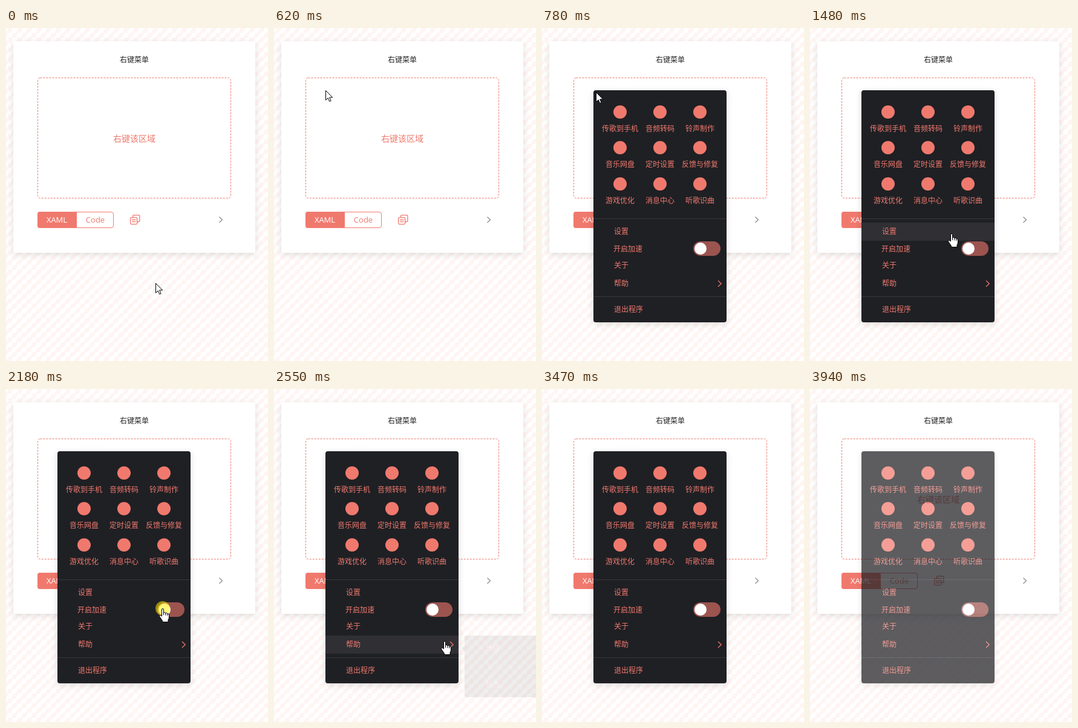
An HTML page for the animation above (4.02 s loop, 433 by 551 pixels).

```html
<!DOCTYPE html>
<html lang="zh-CN">
<head>
<meta charset="utf-8">
<title>右键菜单</title>
<style>
  html, body { margin: 0; width: 100%; height: 100%; overflow: hidden; background: #fff; }
  svg { display: block; width: 433px; height: 551px; }
  text { font: 12px "Noto Sans CJK SC", "Noto Sans CJK", sans-serif; fill: #f0796e; }
  .mid { text-anchor: middle; }
  .latin { font: 13px "Open Sans", "Noto Sans", sans-serif; }
  .line { fill: none; stroke: #f0796e; }
  .panel { fill: #1f2024; }
  .rule { stroke: #37383c; }
  .shadow { filter: drop-shadow(0 3px 6px rgba(0, 0, 0, .12)); }
  .pointer { fill: #fff; stroke: #000; stroke-linejoin: round; }
</style>
</head>
<body>
<svg viewBox="0 0 433 551">
  <defs>
    <pattern id="checks" width="16" height="16" patternUnits="userSpaceOnUse">
      <path d="M4 0H12L8 8H0ZM12 8H20L16 16H8ZM-4 8H4L0 16H-8Z" fill="#fff5f3"/>
    </pattern>
  </defs>
  <rect width="433" height="551" fill="#fff"/>
  <rect width="433" height="551" fill="url(#checks)"/>

  <rect class="shadow" x="12" y="22" width="400" height="350" rx="4" fill="#fff"/>
  <text class="mid" x="212" y="57" style="fill:#222">右键菜单</text>
  <rect class="line" x="52.5" y="82.5" width="319" height="199" rx="4" stroke-dasharray="3 2"/>
  <text class="mid" x="212" y="188" style="font-size:14px">右键该区域</text>

  <rect class="line" x="52.5" y="304.5" width="125" height="26" rx="3.5"/>
  <path d="M117 304V331H56Q52 331 52 327V308Q52 304 56 304Z" fill="#f0796e"/>
  <text class="mid latin" x="84" y="322" style="fill:#fff">XAML</text>
  <text class="mid latin" x="147.5" y="322">Code</text>
  <g class="line" stroke-width="1.3">
    <rect x="205.6" y="313.6" width="11" height="11" rx="1.5"/>
    <path d="M209.6 313.5V311Q209.6 309.6 211 309.6H219.5Q220.9 309.6 220.9 311V319Q220.9 320.5 219.5 320.5H217M208 317.5H214.5M208 320.7H214.5"/>
  </g>
  <path d="M352.5 312.5L357.5 317.2L352.5 322" fill="none" stroke="#8a8a8a" stroke-width="1.2"/>

  <g id="menu">
    <rect class="panel shadow" x="85" y="103" width="220" height="384" rx="4"/>
    <rect id="hover" x="85" width="220" height="30" fill="#2f2f34"/>
    <g id="tiles"></g>
    <path class="rule" d="M85 315.5H305M85 444.5H305"/>
    <g id="rows"></g>
    <rect x="250" y="353" width="45" height="24" rx="12" fill="#9c544f"/>
    <circle cx="262" cy="365" r="10" fill="#fff"/>
    <path class="line" d="M291 418L296.2 423L291 428" stroke-width="1.2"/>
  </g>
  <g id="submenu">
    <path class="panel shadow" d="M440 408H319Q315 408 315 412V424L310 429L315 434V506Q315 510 319 510H440Z"/>
    <text x="349" y="433">升级</text>
    <text x="349" y="463" opacity=".4">关于</text>
    <text x="349" y="493">日志</text>
  </g>

  <g id="cursor">
    <circle id="ring" r="12" fill="#fff000" opacity=".52"/>
    <path id="arrow" class="pointer" d="M.5 .5V16.3L4.2 12.8L6.7 18.5L9.1 17.5L6.7 11.9H11.7Z"/>
    <g id="hand">
      <path class="pointer" d="M-1.5 13V2Q-1.5 .5 0 .5T1.5 2V7Q3.5 5.8 4.8 7.7Q6.7 6.7 7.8 8.7Q10.5 8.2 10.5 11V15Q10.5 17 9 19V22.5H-.5V20.5L-5 14Q-6 12 -4.5 11.5Q-3 11 -1.5 13Z"/>
      <path d="M1.5 7V11M4.8 8V11.5M7.8 9V12" stroke="#000" fill="none"/>
    </g>
  </g>
</svg>
<script>
const LOOP = 4020;
const TICK = LOOP / 52;
const el = id => document.getElementById(id);

const labels = ["传歌到手机", "音频转码", "铃声制作", "音乐网盘", "定时设置", "反馈与修复", "游戏优化", "消息中心", "听歌识曲"];
el("tiles").innerHTML = labels.map((label, i) => {
  const x = 129 + 66 * (i % 3);
  const y = 139 + Math.floor(59.5 * Math.floor(i / 3));
  return `<circle cx="${x}" cy="${y}" r="11" fill="#f0796e"/><text class="mid" x="${x}" y="${y + 32}">${label}</text>`;
}).join("");

const rows = [
  { label: "设置", y: 341 },
  { label: "开启加速", y: 370, toggle: true },
  { label: "关于", y: 397 },
  { label: "帮助", y: 427 },
  { label: "退出程序", y: 470 }
];
const help = rows[3];
el("rows").innerHTML = rows.map(({ label, y, toggle }) =>
  `<text x="${toggle ? 118 : 119}" y="${y}">${label}</text>`).join("");

const ramp = (t, from, to) => Math.min(1, Math.max(0, (t - from) / (to - from)));
const linear = p => p;
const easeIn = p => p * p;
const easeOut = p => 1 - (1 - p) ** 2;
const smooth = p => p * p * (3 - 2 * p);

// The pointer rests between these moves.
const origin = { x: 247, y: 422 };
const moves = [
  { from: 0, to: 460, x: 85, y: 103, ease: smooth },
  { from: 700, to: 1080, x: 188, y: 186, ease: easeIn },
  { from: 1080, to: 1620, x: 238, y: 353, ease: easeOut },
  { from: 1620, to: 2010, x: 259, y: 363, ease: easeOut },
  { from: 2170, to: 2470, x: 282, y: 417, ease: smooth },
  { from: 2870, to: 3320, x: 320, y: 518, ease: easeIn },
  { from: 3320, to: 3470, x: 400, y: 564, ease: linear }
];

function pointerAt(t) {
  let { x, y } = origin;
  for (const move of moves) {
    const p = move.ease(ramp(t, move.from, move.to));
    x += (move.x - x) * p;
    y += (move.y - y) * p;
  }
  return { x: Math.round(x), y: Math.round(y) };
}

const show = (id, on) => el(id).setAttribute("visibility", on ? "visible" : "hidden");

function draw(now) {
  const t = Math.floor((now % LOOP + 10) / TICK) * TICK % LOOP;
  const { x, y } = pointerAt(t);
  const menu = ramp(t, 620, 770) - ramp(t, 3870, 4130);
  const submenu = ramp(t, 2540, 2700) - ramp(t, 3170, 3320);
  const inside = menu > 0 && x < 305 && y > 115 && y < 481;
  const hovered = inside && rows.find(row => !row.toggle && y >= row.y - 19 && y < row.y + 11);
  const lit = hovered || (submenu === 1 && help);

  el("menu").setAttribute("opacity", menu);
  el("submenu").setAttribute("opacity", submenu);
  el("hover").setAttribute("y", (lit || help).y - 19);
  show("hover", lit);
  el("cursor").setAttribute("transform", `translate(${x} ${y})`);
  show("hand", inside);
  show("arrow", !inside);
  show("ring", (t > 530 && t < 610) || (t > 2150 && t < 2240));
  requestAnimationFrame(time => draw(Math.max(0, time - start)));
}

const start = performance.now();
draw(0);
</script>
</body>
</html>
```
